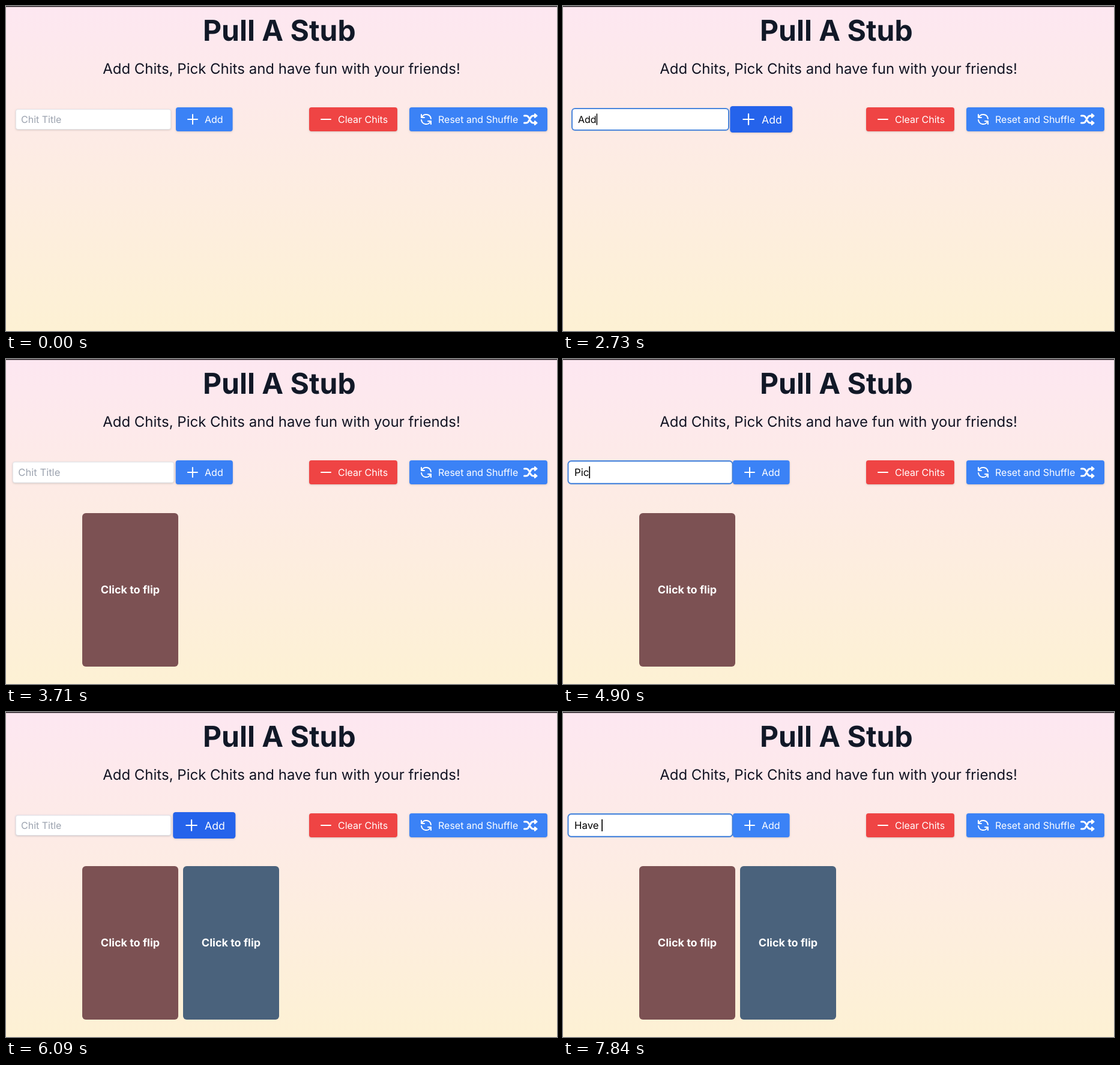
An HTML page with a canvas that plays this animation: 918x542 px, repeating every 8 s.

```html
<!DOCTYPE html>
<html lang="en">
<head>
<meta charset="utf-8">
<title>Pull A Stub</title>
<style>
  html, body { margin: 0; width: 918px; height: 542px; overflow: hidden; }
  canvas { display: block; }
</style>
</head>
<body>
<canvas id="stage" width="918" height="542"></canvas>
<script>
const ctx = document.getElementById('stage').getContext('2d');
const LOOP = 8000;
const MID = 189;
const BASELINE = 195;
const BLUE = [59, 130, 246], DEEP_BLUE = [37, 99, 235], RED = [239, 68, 68];

// [time, target] pairs: 1 is on, 0 is off
const inputHover = [[1280, 1], [2420, 0], [3560, 1], [5500, 0], [6230, 1]];
const inputFocus = [[1370, 1], [3190, 0], [3850, 1], [5930, 0], [6370, 1]];
const addHover = [[2430, 1], [3500, 0], [5510, 1], [6170, 0]];
const typing = [
  [1820, 'A'], [2030, 'Ad'], [2240, 'Add'], [3290, ''],
  [4620, 'P'], [4760, 'Pi'], [4900, 'Pic'], [5040, 'Pick'], [6020, ''],
  [7210, 'H'], [7490, 'Ha'], [7630, 'Hav'], [7700, 'Have'], [7840, 'Have '],
];
const cards = [
  { x: 127, from: 3290, color: '#7c5153' },
  { x: 295, from: 6020, color: '#4a627c' },
];

const icons = {
  plus: new Path2D('M12 4v16m8-8H4'),
  minus: new Path2D('M20 12H4'),
  refresh: new Path2D('M4 4v5h.582m15.356 2A8 8 0 0 0 4.582 9m0 0H9m11 11v-5h-.581m0 0a8 8 0 0 1-15.357-2m15.357 2H15'),
  shuffle: new Path2D('M1.5 18h3c1.4 0 2.7-.7 3.6-1.8l4.8-8.4c.9-1.1 2.2-1.8 3.6-1.8h2M1.5 6h3c1.4 0 2.7.7 3.6 1.8l.9 1.5M12 14.7l.9 1.5c.9 1.1 2.2 1.8 3.6 1.8h2'),
  arrows: new Path2D('M19 3l3.6 3-3.6 3zM19 15l3.6 3-3.6 3z'),
};

const clamp = v => Math.min(1, Math.max(0, v));
const mix = (a, b, k) => a + (b - a) * k;
const rgb = c => `rgb(${c.map(Math.round).join()})`;

// cubic-bezier(.4, 0, .2, 1)
function ease(p) {
  if (p <= 0 || p >= 1) return clamp(p);
  let lo = 0, hi = 1;
  for (let i = 0; i < 20; i++) {
    const u = (lo + hi) / 2, v = 1 - u;
    if (1.2 * v * v * u + 0.6 * v * u * u + u * u * u < p) lo = u; else hi = u;
  }
  return lo * lo * (3 - 2 * lo);
}

const latest = (events, t) => events.filter(e => e[0] <= t).pop() || [0, ''];

function transition(events, t, duration) {
  const [start, target] = latest(events, t);
  return target === '' ? 0 : mix(1 - target, target, ease((t - start) / duration));
}

function text(str, x, y, size, color, weight = 400, align = 'left') {
  ctx.font = `${weight} ${size}px Inter, sans-serif`;
  ctx.textAlign = align;
  ctx.fillStyle = color;
  ctx.fillText(str, x, y);
}

function box(x, y, w, h, r, color) {
  ctx.beginPath();
  ctx.roundRect(x, y, w, h, r);
  ctx.fillStyle = color;
  ctx.fill();
}

function withShadow(draw) {
  ctx.save();
  ctx.shadowColor = 'rgba(0, 0, 0, .16)';
  ctx.shadowBlur = 3;
  ctx.shadowOffsetY = 1;
  draw();
  ctx.restore();
}

function scaled(cx, scale, draw) {
  ctx.save();
  ctx.translate(cx, MID);
  ctx.scale(scale, scale);
  ctx.translate(-cx, -MID);
  draw();
  ctx.restore();
}

function icon(name, x, width = 2) {
  ctx.save();
  ctx.translate(x, MID - 12);
  ctx.lineWidth = width;
  ctx.lineCap = ctx.lineJoin = 'round';
  ctx.strokeStyle = ctx.fillStyle = '#fff';
  ctx.stroke(icons[name]);
  if (name === 'arrows') ctx.fill(icons[name]);
  ctx.restore();
}

function button(x, w, color, iconName, label) {
  withShadow(() => box(x, 169, w, 40, 4, rgb(color)));
  icon(iconName, x + 16);
  text(label, x + 48, BASELINE, 16, '#fff');
}

function background() {
  const g = ctx.createLinearGradient(0, 0, 0, 542);
  g.addColorStop(0, '#fde7f1');
  g.addColorStop(1, '#fdf1d4');
  ctx.fillStyle = g;
  ctx.fillRect(0, 0, 918, 542);
  ctx.fillStyle = '#231d22';
  ctx.fillRect(0, 0, 918, 1.5);
}

function caretAlpha(age) {
  const phase = age % 1000;
  return phase < 800 ? 1 - clamp((phase - 480) / 150) : clamp((phase - 900) / 100);
}

function input(t) {
  const focus = transition(inputFocus, t, 200);
  const [typedAt, value] = latest(typing, t);
  const [focusedAt, focused] = latest(inputFocus, t);
  scaled(145.5, 1 + 0.05 * transition(inputHover, t, 300), () => {
    withShadow(() => box(16, 172, 259, 34, 4, '#e5e7eb'));
    if (focus > 0) {
      ctx.globalAlpha = focus;
      box(14, 170, 263, 38, 6, '#4a86dc');
      box(16, 172, 259, 34, 4, '#fff');
      ctx.globalAlpha = 1;
    }
    box(17, 173, 257, 32, 3, '#fff');
    text(value || 'Chit Title', 25, BASELINE, 16, value ? '#000' : '#9ca3af');
    if (focused) {
      const x = 25 + (value ? ctx.measureText(value).width : 0);
      ctx.globalAlpha = caretAlpha(t - Math.max(typedAt, focusedAt));
      ctx.fillStyle = '#000';
      ctx.fillRect(x, 179.5, 1.6, 19);
      ctx.globalAlpha = 1;
    }
  });
}

function addButton(t) {
  const hover = transition(addHover, t, 300);
  const color = BLUE.map((c, i) => mix(c, DEEP_BLUE[i], hover));
  scaled(330.3, 1 + 0.1 * hover, () => button(283, 94.6, color, 'plus', 'Add'));
}

function render(t) {
  background();
  text('Pull A Stub', 328, 58, 48, '#111827', 700);
  text('Add Chits, Pick Chits and have fun with your friends!', 459, 113, 24, '#111322', 400, 'center');
  input(t);
  addButton(t);
  button(505, 147, RED, 'minus', 'Clear Chits');
  button(672, 230, BLUE, 'refresh', 'Reset and Shuffle');
  icon('shuffle', 862, 3);
  icon('arrows', 862, 2);
  for (const { x, from, color } of cards) {
    if (t < from) continue;
    box(x, 257, 160, 256, 6, color);
    text('Click to flip', x + 80, 391, 18, '#fff', 700, 'center');
  }
}

ctx.textRendering = 'geometricPrecision';
const begin = performance.now();
function tick() {
  render((performance.now() - begin) % LOOP);
  requestAnimationFrame(tick);
}
tick();
</script>
</body>
</html>
```
